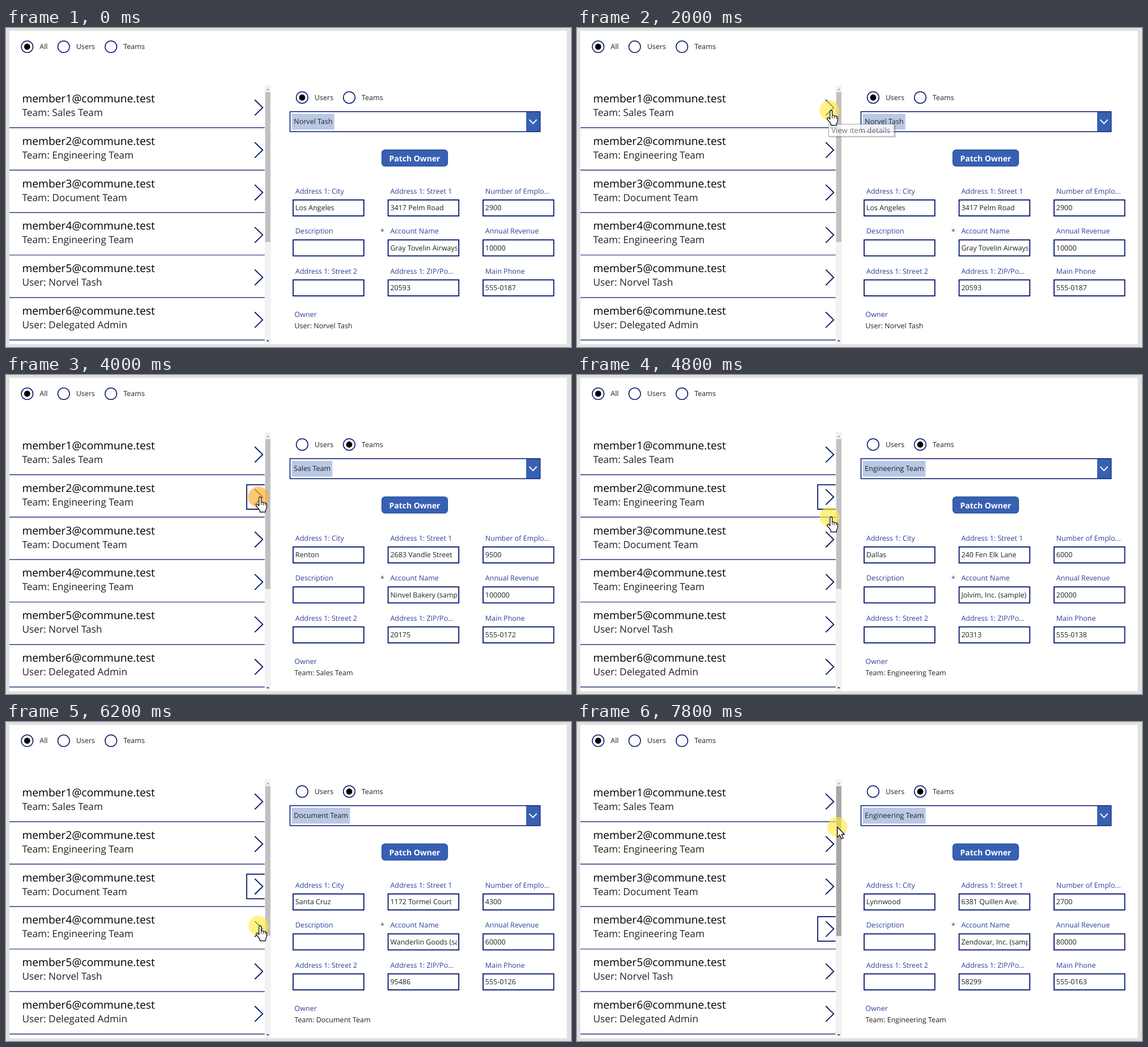
These frames come from a looping animation (996 px wide and 562 px high, 8000 ms). An HTML page:

```html
<!DOCTYPE html>
<html lang="en">
<head>
<meta charset="utf-8">
<title>Record owners</title>
<style>
  html, body { margin: 0; width: 100%; height: 100%; overflow: hidden; background: #e1e1e1; }
  svg { display: block; width: 996px; height: 562px; font: 12.5px "Open Sans", "Noto Sans", sans-serif; }
  text { fill: #222; white-space: pre; text-rendering: geometricPrecision; }
  .line { fill: none; stroke: #00126b; stroke-width: 1.5; }
  .box { fill: #fff; stroke: #00126b; stroke-width: 1.8; }
  .label { fill: #2b429b; }
  .title { font-size: 19.17px; font-weight: 500; fill: #000; }
  .sub { font-size: 17.26px; }
  .button { font-size: 13.95px; font-weight: 700; fill: #fff; text-anchor: middle; }
  .tip { font-size: 13.2px; fill: #484848; }
  .pointer { fill: #fff; stroke: #111; stroke-width: 1.3; stroke-linejoin: round; }
</style>
</head>
<body>
<svg id="stage" viewBox="0 0 996 562"></svg>
<script>
const svg = document.getElementById('stage');
const LOOP = 8000, TICK = 200, ROW = 74.8;

function add(tag, attrs, content, parent = svg) {
  const el = document.createElementNS('http://www.w3.org/2000/svg', tag);
  for (const k in attrs) el.setAttribute(k, attrs[k]);
  if (content) el.textContent = content;
  return parent.appendChild(el);
}
const text = (x, y, str, cls = '', parent = svg) => add('text', { x, y, class: cls }, str, parent);
const rect = (x, y, width, height, rest, parent = svg) =>
  add('rect', { x, y, width, height, ...rest }, '', parent);
const path = (d, rest = { class: 'line' }, parent = svg) => add('path', { d, ...rest }, '', parent);
const show = (el, on) => el.setAttribute('visibility', on ? 'visible' : 'hidden');

function radio(x, y, name, on) {
  add('circle', { cx: x, cy: y, r: 10.3, class: 'line' });
  const dot = add('circle', { cx: x, cy: y, r: 5.4 });
  text(x + 22, y + 4.3, name);
  show(dot, on);
  return dot;
}

rect(6, 5, 982.5, 552, { fill: '#fff' });
radio(37.3, 33, 'All', true);
radio(101.7, 33, 'Users', false);
radio(185, 33, 'Teams', false);

// Left list
const person = 'Norvel Tash';
const owners = ['Team: Sales Team', 'Team: Engineering Team', 'Team: Document Team',
  'Team: Engineering Team', 'User: ' + person, 'User: Delegated Admin'];
owners.forEach((owner, i) => {
  const y = i * ROW;
  text(28.5, 131 + y, `member${i + 1}@commune.test`, 'title');
  text(28.5, 155 + y, owner, 'sub');
  path(`M6 ${175.6 + y}H456`, { class: 'line', style: 'stroke-width:1.2' });
  path(`M438.5 ${126.5 + y}l14 13.7l-14 13.7`, { class: 'line', style: 'stroke-width:1.8' });
});
const focus = path('M456 118.5H424.3V161.7H456', { class: 'line', style: 'stroke-width:1.8' });

rect(456, 101, 11, 455.5, { fill: '#f2f2f2' });
const thumb = rect(457, 113, 9, 264, {});
path('M459 109.5h5l-2.5-3z', { fill: '#a0a0a0' });
path('M459 550h5l-2.5 3z', { fill: '#404040' });

// Owner picker
const userDot = radio(522, 122.5, 'Users', true);
const teamDot = radio(605, 122.5, 'Teams', false);
rect(500.6, 147.4, 441, 35.2, { class: 'line' });
rect(917, 148, 24.3, 34, { fill: '#3860b2' });
path('M922.5 161.5l6.5 6.8l6.5-6.8', { fill: 'none', stroke: '#fff', 'stroke-width': 1.9 });
const mark = rect(503.5, 151, 0, 28, { fill: '#b9c9e5' });
const picked = text(507.3, 169.3, '');

rect(662.5, 214.5, 116, 29, { rx: 6, fill: '#3860b2', stroke: '#25519b', 'stroke-width': 1.2 });
text(720.5, 235, 'Patch Owner', 'button');

// Form
const labels = ['Address 1: City', 'Address 1: Street 1', 'Number of Emplo...',
  'Description', 'Account Name', 'Annual Revenue',
  'Address 1: Street 2', 'Address 1: ZIP/Po...', 'Main Phone'];
const fields = labels.map((label, i) => {
  const x = 506.2 + (i % 3) * 167.4, y = 302.9 + Math.floor(i / 3) * 70.4;
  text(x + 3.8, y - 11.2, label, 'label');
  rect(x, y, 124.6, 28.2, { class: 'box' });
  const pane = add('svg', { x: x + 2, y, width: 119.8, height: 28 });
  return text(1.8, 18.6, '', '', pane);
});
text(660, 363, '*', 'label');
text(508.5, 508.8, 'Owner', 'label');
const ownerText = text(508.5, 528.8, '');

const record = (city, street, staff, name, revenue, zip, phone) =>
  [city, street, staff, '', name, revenue, '', zip, phone];
const records = [
  record('Los Angeles', '3417 Pelm Road', '2900', 'Gray Tovelin Airways', '10000', '20593', '555-0187'),
  record('Renton', '2683 Vandle Street', '9500', 'Ninvel Bakery (sample)', '100000', '20175', '555-0172'),
  record('Dallas', '240 Fen Elk Lane', '6000', 'Jolvim, Inc. (sample)', '20000', '20313', '555-0138'),
  record('Santa Cruz', '1172 Tormel Court', '4300', 'Wanderlin Goods (sample)', '60000', '95486', '555-0126'),
  record('Lynnwood', '6381 Quillen Ave.', '2700', 'Zendovar, Inc. (sample)', '80000', '58299', '555-0163')
];

// Tooltip and pointer
const tip = add('g');
rect(2, 2, 117, 22, { fill: '#000', opacity: .22 }, tip);
rect(.5, .5, 115.5, 21.5, { fill: '#fff', stroke: '#8a8a8a' }, tip);
text(5.5, 15.7, 'View item details', 'tip', tip);

const pointer = add('g');
add('circle', { r: 17.5, fill: '#ffeb3b', opacity: .62 }, '', pointer);
const burst = add('circle', { fill: '#f4512a', stroke: '#f4512a', 'stroke-width': 2.4, 'stroke-dasharray': '3 2' }, '', pointer);
const hand = add('g', { class: 'pointer' }, '', pointer);
path('M1 2.5Q1 0 3 0T5 2.5V9Q7 8 8.5 10Q11 9 12 11Q14.5 10.5 14.5 13.5V18Q14.5 21 12.5 23V26.5H2.5V23.5L-4 15.5Q-4.5 12.5-1.5 13L1 15.5Z', {}, hand);
path('M5 9V14M8.5 10.5V14.5M12 11.5V15', { 'stroke-width': 1 }, hand);
const arrow = path('M0 0V18L4.2 14.2L7.2 21L10.4 19.6L7.4 13H12.6Z', { class: 'pointer' }, pointer);

// Each track is a list of [time, ...values], held until the next entry
const tracks = {
  move: [[0], [1200, 408, 116], [1400, 431, 135], [1600, 445, 145], [2800, 445, 149],
    [3000, 444.5, 156], [3200, 445, 186], [3400, 445, 215], [4800, 445, 250],
    [5000, 445, 289], [6000, 445, 322], [6200, 445, 359], [6400, 445, 362],
    [7400, 449, 310], [7600, 456, 235], [7800, 459, 185]],
  form: [[0, 0], [2600, 1], [4400, 2], [6000, 3], [7200, 4]],
  owner: [[0, 4], [2600, 0], [4800, 1], [6000, 2], [7000, 3]],
  focus: [[0, -1], [2200, 0], [3800, 1], [5400, 2], [6600, 3]],
  tip: [[0, 0], [2000, .75, 443, 169], [2200, 1, 443, 169], [2400, 0],
    [5200, .75, 445, 311], [5400, 1, 445, 311], [5600, 0]]
};
const clicks = [2200, 3800, 5400, 6600];
const at = (name, t) => tracks[name].findLast(k => k[0] <= t).slice(1);

function draw(t) {
  const [x, y] = at('move', t);
  show(pointer, x !== undefined);
  if (x !== undefined) pointer.setAttribute('transform', `translate(${x} ${y})`);
  const onBar = t >= 7600;
  hand.style.display = onBar ? 'none' : '';
  arrow.style.display = onBar ? '' : 'none';
  thumb.setAttribute('fill', onBar ? '#a8a8a8' : '#c1c1c1');

  // A click is a small red burst that grows and pales
  const age = t - (clicks.findLast(c => c <= t) ?? -LOOP);
  const step = Math.floor(age / TICK);
  burst.style.display = step < 2 ? '' : 'none';
  burst.setAttribute('r', 8 + step * 10);
  burst.setAttribute('opacity', step ? .25 : .8);

  const [row] = at('focus', t);
  show(focus, row >= 0);
  focus.setAttribute('transform', `translate(0 ${row * ROW})`);

  const [alpha, tx = 0, ty = 0] = at('tip', t);
  tip.setAttribute('opacity', alpha);
  tip.setAttribute('transform', `translate(${tx} ${ty})`);

  const values = records[at('form', t)[0]];
  fields.forEach((f, i) => f.textContent = values[i]);

  const owner = owners[at('owner', t)[0]];
  ownerText.textContent = owner;
  picked.textContent = owner.slice(6);
  mark.setAttribute('width', picked.getComputedTextLength() + 7);
  const isUser = owner.startsWith('User');
  show(userDot, isUser);
  show(teamDot, !isUser);
}

const start = performance.now();
function loop() {
  draw((performance.now() - start) % LOOP);
  requestAnimationFrame(loop);
}
loop();
</script>
</body>
</html>
```
